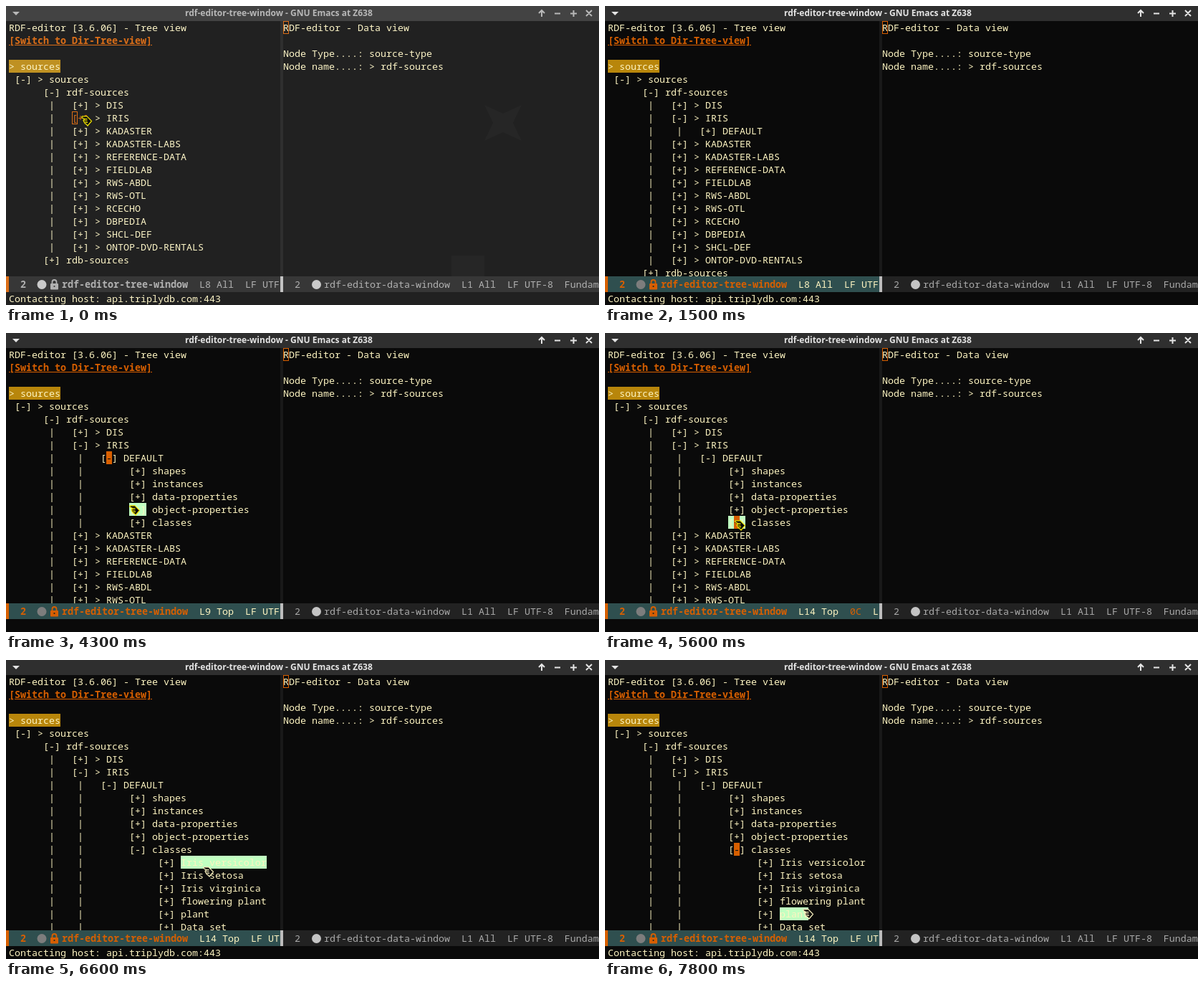
These frames come from a looping animation (828x417 px, 8000 ms). An HTML page:

```html
<!DOCTYPE html>
<html lang="en">
<head>
<meta charset="utf-8">
<title>RDF editor</title>
<style>
  html, body { margin: 0; width: 100%; height: 100%; overflow: hidden; background: #0a0a0a; }
  #stage { position: absolute; left: 0; top: 0; width: 828px; height: 417px; overflow: hidden;
    background: #0a0a0a; color: #fdf4c1; font: 13.3333px/18px "Noto Sans Mono", monospace;
    font-variant-ligatures: none; }
  #stage div, #stage svg, #stage pre { position: absolute; margin: 0; white-space: pre; font-family: inherit; }
  svg { left: 0; top: 0; }
  #title { left: 0; top: 0; width: 828px; height: 21px; background: #2f2f2f; color: #e4e4e4; }
  #title div { left: 250px; top: 1px; font: bold 12px/18px "Noto Sans", sans-serif; }
  #panes { left: 0; top: 21px; width: 828px; height: 356px; overflow: hidden; }
  #tree { left: 4px; top: 0; }
  #data { left: 387px; top: 0; }
  #link { left: 4px; top: 18px; color: #d75f00; font-weight: bold; text-decoration: underline; }
  #root { left: 4px; top: 54px; background: #b8860b; }
  #split { left: 383px; top: 0; width: 4px; height: 356px; background: #191919; }
  .box { height: 18px; }
  .hollow { box-sizing: border-box; width: 8px; border: 1px solid #d75f00; }
  .bar { top: 377px; height: 22px; line-height: 22px; overflow: hidden; background: #222; color: #a9a9a9; }
  .bar div { top: 0; }
  .bar.on { background: #2f4f4f; color: #fdf4c1; }
  .bar.on .key { color: #d75f00; }
  .bold { font-weight: bold; }
  .hot { color: #d75f00; }
  #echo { left: 4px; top: 399px; }
  #veil { inset: 0; background: rgba(255, 255, 255, .095); }
</style>
</head>
<body>
<div id="stage">
  <div id="title"><div>rdf-editor-tree-window - GNU Emacs at Z638</div>
    <svg width="828" height="21" fill="none" stroke="currentColor" stroke-width="2">
      <path d="M9 8H19L14 13Z" fill="currentColor" stroke="none"/>
      <path d="M748 15V7M744 10L748 6L752 10M766 10.5H774M788 10.5H797M792.5 6V15M810 6L818 14M818 6L810 14"/>
    </svg>
  </div>
  <div id="panes">
    <div id="hover" class="box" style="background:#c1ffc1"></div>
    <div id="root">&gt; sources</div>
    <pre id="tree"></pre>
    <div id="link">[Switch to Dir-Tree-view]</div>
    <div id="press" class="hot" style="left:92px;top:126px;background:#0a0a0a">[+]</div>
    <div id="cursor" class="box"></div>
    <div id="split"></div>
    <pre id="data"></pre>
    <div class="box hollow" style="left:387px;top:0"></div>
  </div>
  <div id="left" class="bar" style="left:0;width:383px">
    <div style="left:0;width:4px;height:22px;background:#d75f00"></div>
    <div class="key bold" style="left:20px">2</div>
    <div class="key bold" style="left:78px">rdf-editor-tree-window</div>
    <div id="status" style="left:270px"></div>
    <svg class="key" width="100" height="22" fill="currentColor">
      <circle id="dot" cx="50" cy="11.5" r="6.5"/>
      <rect x="62" y="10" width="11" height="8.5" rx="1"/>
      <path d="M64.5 11V8a3 3 0 0 1 6 0V11" fill="none" stroke="currentColor" stroke-width="1.8"/>
      <circle cx="67.5" cy="14" r="1.1" fill="#222"/>
    </svg>
  </div>
  <div style="left:383px;top:377px;width:4px;height:22px;background:#bdbdbd"></div>
  <div class="bar" style="left:387px;width:441px">
    <div style="left:16px">2</div>
    <svg width="60" height="22"><circle cx="46.5" cy="11.5" r="6.5" fill="#c4c4c4"/></svg>
    <div style="left:57px">rdf-editor-data-window  L1 All  LF UTF-8  Fundamental</div>
  </div>
  <div id="echo"></div>
  <div id="veil">
    <svg width="828" height="417" fill="#fff" fill-opacity=".025">
      <path d="M668 138L694 150L720 138L708 163L720 188L694 176L668 188L680 163Z"/>
      <rect x="622" y="348" width="46" height="29"/>
    </svg>
  </div>
  <svg id="hand" width="18" height="18" fill="#0a0a0a" stroke-width="1.2">
    <path d="M1.5 .8H8L14.5 7.5L9 14L7 11.8L5.5 11L4 8.8L3 6.3L5 4.6L1.5 3L.7 1.8Z"/>
    <path d="M5 4.6H8.5M4 7H8.5M5.3 9.4H9" fill="none"/>
  </svg>
</div>
<script>
const $ = id => document.getElementById(id);
const LOOP = 8000, TOP = 21, ROW = 18, LEFT = 4, COL = 8;

// Tree rows: [text, bracket column, name column]
const pad = (bars, col) => {
  let s = "";
  for (let i = 0; i < col; i++) s += bars.includes(i) ? "|" : " ";
  return s;
};
const node = (bars, col, name, open = false, mark = "") =>
  [pad(bars, col) + (open ? "[-] " : "[+] ") + mark + name, col, col + 4 + mark.length];
const plain = text => [text, -1, -1];

const repos = "KADASTER KADASTER-LABS REFERENCE-DATA FIELDLAB RWS-ABDL RWS-OTL RCECHO DBPEDIA SHCL-DEF ONTOP-DVD-RENTALS".split(" ");
const kinds = ["shapes", "instances", "data-properties", "object-properties", "classes"];
const classes = ["Iris versicolor", "Iris setosa", "Iris virginica", "flowering plant", "plant", "Data set"];
const repo = (name, open) => node([7], 11, name, open, "> ");

function buildTree(level) {
  const rows = [
    plain("RDF-editor [3.6.06] - Tree view"), plain(""), plain(""), plain(""),
    node([], 1, "sources", true, "> "),
    node([], 6, "rdf-sources", true),
    repo("DIS"), repo("IRIS", level > 0),
  ];
  if (level > 0) rows.push(node([7, 12], 16, "DEFAULT", level > 1));
  if (level > 1) kinds.forEach(k => rows.push(node([7, 12], 21, k, level > 2 && k === "classes")));
  if (level > 2) classes.forEach(c => rows.push(node([7, 12], 26, c)));
  return rows.concat(repos.map(r => repo(r)), [node([], 6, "rdb-sources")]);
}
const trees = [0, 1, 2, 3].map(buildTree);

// Last entry whose time has come
const at = (table, t) => table.filter(e => e[0] <= t).pop();

const levels = [[0, 0], [1000, 1], [3100, 2], [5800, 3]];
const statuses = [[0, "L8 All  LF UTF-8"], [3100, "L9 Top  LF UTF-8"],
  [5600, "L14 Top  ", "0C", "  LF UTF-8"], [5800, "L14 Top  LF UTF-8"]];
const echoes = [[0, 1], [3100, 0], [5700, 1]];

// Text cursor: time, row, column, visible
const cursors = [
  [0, 7, 11, 1], [900, 7, 12, 1], [1500, 7, 12, 0], [2000, 7, 12, 1], [2500, 7, 12, 0],
  [3100, 8, 17, 1], [3500, 8, 17, 0], [4000, 8, 17, 1], [4700, 8, 17, 0], [5200, 8, 17, 1],
  [5600, 13, 22, 1], [6300, 13, 22, 0], [6800, 13, 22, 1], [7300, 13, 22, 0], [7800, 13, 22, 1],
];

// Pointer: start, end of move, from x y, to x y
const moves = [
  [0, 0, 105, 153, 105, 153], [1000], [1600, 1900, 120, 162, 144, 176], [3100],
  [4000, 4400, 144, 176, 181, 261], [5700],
  [6500, 6600, 240, 276, 275, 288], [6600, 7300, 275, 288, 276, 349], [7800, 7800, 276, 347, 276, 347],
];

function pointer(t) {
  const [start, end, x0, y0, x1, y1] = at(moves, t);
  if (end === undefined) return null;
  const k = end > start ? Math.min(1, (t - start) / (end - start)) : 1;
  return { x: Math.round(x0 + (x1 - x0) * k), y: Math.round(y0 + (y1 - y0) * k) };
}

// Token under the pointer: its row, column and length
function hit(rows, p) {
  const r = Math.floor((p.y + 1 - TOP) / ROW), c = (p.x - LEFT) / COL;
  const [text, bracket, name] = rows[r];
  if (bracket < 0) return null;
  if (c >= bracket && c < bracket + 3) return { r, c: bracket, n: 3 };
  if (c >= name && c < text.length) return { r, c: name, n: text.length - name };
  return null;
}

const show = (el, on) => { el.style.display = on ? "" : "none"; };
const place = (el, r, c, n) => {
  el.style.left = LEFT + c * COL + "px";
  el.style.top = r * ROW + "px";
  el.style.width = n * COL + "px";
};

$("data").textContent = "RDF-editor - Data view\n\nNode Type....: source-type\nNode name....: > rdf-sources";

function draw(time) {
  const t = Math.floor(time / 100) * 100;
  const blurred = t < 800, active = t >= 900;
  const rows = trees[at(levels, t)[1]];
  $("tree").textContent = rows.map(r => r[0]).join("\n");

  show($("veil"), blurred);
  $("title").style.color = blurred ? "#b0b0b0" : "#e4e4e4";
  $("left").classList.toggle("on", active);
  $("dot").style.fill = active ? "#7d7d7d" : "#c4c4c4";
  const [, head, col = "", tail = ""] = at(statuses, t);
  const tag = document.createElement("span");
  tag.className = "hot";
  tag.textContent = col;
  $("status").replaceChildren(head, tag, tail);
  $("echo").textContent = at(echoes, t)[1] ? "Contacting host: api.triplydb.com:443" : "";
  show($("press"), t < 900);

  const [, r, c, lit] = at(cursors, t), cursor = $("cursor");
  show(cursor, lit);
  place(cursor, r, c, 1);
  cursor.classList.toggle("hollow", blurred);
  cursor.style.background = blurred ? "none" : "#d75f00";
  cursor.style.color = "#0a0a0a";
  cursor.textContent = blurred ? "" : rows[r][0][c];

  const p = pointer(t), hand = $("hand");
  const h = p && t >= 1600 && hit(rows, p);
  show(hand, p);
  show($("hover"), h);
  if (h) place($("hover"), h.r, h.c, h.n);
  if (p) {
    hand.style.left = p.x + "px";
    hand.style.top = p.y + "px";
    hand.style.stroke = t < 6000 ? "#f5e800" : "#fdf4c1";
  }
}

const begin = performance.now();
let last = -1;
function tick() {
  const t = (performance.now() - begin) % LOOP, step = Math.floor(t / 100);
  if (step !== last) draw(t);
  last = step;
  requestAnimationFrame(tick);
}
tick();
</script>
</body>
</html>
```
